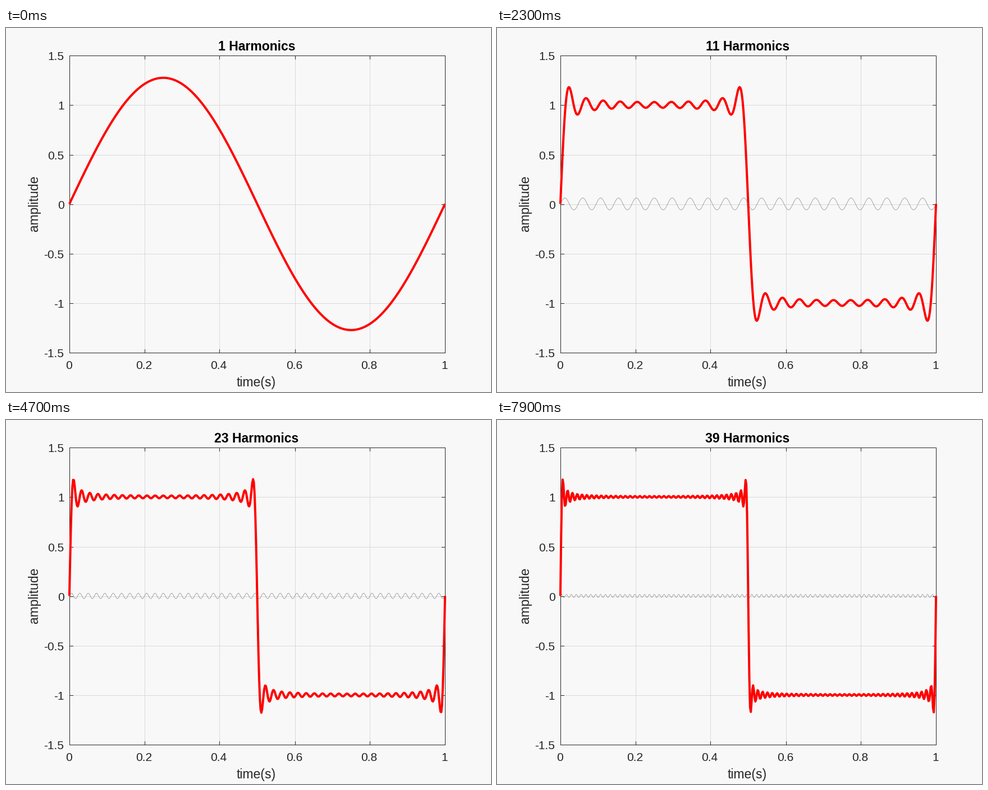
Write a matplotlib script that moves like this. It is 864 px wide and 648 px high and loops after 8 s.

```python
import numpy as np
import matplotlib.pyplot as plt
from matplotlib.animation import FuncAnimation

W, H = 864, 648
BG, INK, GRID = "#f8f8f8", "#262626", "#d9d9d9"
COLS = [113, 247, 380, 515, 648, 782]
ROWS = [49, 137, 226, 314, 402, 490, 578]
LEFT, RIGHT, TOP, BOTTOM = COLS[0], COLS[-1], ROWS[0], ROWS[-1]
TICK = 7

plt.rcParams["font.family"] = "Liberation Sans"
plt.rcParams["path.simplify"] = False

fig = plt.figure(figsize=(W / 72, H / 72), dpi=72, facecolor=BG)
ax = fig.add_axes([0, 0, 1, 1])
ax.set_xlim(0, W)
ax.set_ylim(H, 0)
ax.axis("off")


def rule(x0, y0, x1, y1, color, z):
    """One-pixel straight line between pixel indices, both included."""
    ax.plot([x0 + 0.5, x1 + 0.5], [y0 + 0.5, y1 + 0.5], color=color, lw=1,
            solid_capstyle="projecting", snap=False, zorder=z)


def label(x, y, s, size=23, color=INK, ha="center", **kw):
    return ax.text(x, y, s, size=size, color=color, ha=ha, va="baseline", **kw)


for x in COLS[1:-1]:
    rule(x, TOP, x, BOTTOM, GRID, 1)
for y in ROWS[1:-1]:
    rule(LEFT, y, RIGHT, y, GRID, 1)

for i, x in enumerate(COLS):
    rule(x, TOP, x, TOP + TICK - 1, INK, 2)
    rule(x, BOTTOM - TICK + 1, x, BOTTOM, INK, 2)
    label(x - 1, 607, f"{i * 0.2:.1g}", 21)
for i, y in enumerate(ROWS):
    rule(LEFT, y, LEFT + TICK - 1, y, INK, 2)
    rule(RIGHT - TICK + 1, y, RIGHT, y, INK, 2)
    label(103.5, y + 8, f"{1.5 - i * 0.5:g}", 21, ha="right")

for x in (LEFT, RIGHT):
    rule(x, TOP, x, BOTTOM, INK, 2)
for y in (TOP, BOTTOM):
    rule(LEFT, y, RIGHT, y, INK, 2)

label(446, 638, "time(s)")
label(57, 312, "amplitude", rotation=90, rotation_mode="anchor")
title = label(446.5, 40, "", color="black", weight="bold")

t = np.linspace(0, 1, 500)
px = 112.9 + 669.2 * t
term_line, = ax.plot(px, px, color="#808080", lw=0.67, zorder=3)
sum_line, = ax.plot(px, px, color="red", lw=4, zorder=4,
                    solid_capstyle="butt", solid_joinstyle="round")


def term(k):
    """k-th odd harmonic of a unit square wave."""
    n = 2 * k - 1
    return 4 / (np.pi * n) * np.sin(2 * np.pi * n * t)


def to_px(v):
    return 313.2 - 176.33 * v


def draw(frame):
    count = 1 if frame < 5 else 2 + (frame - 5) // 2
    term_line.set_ydata(to_px(term(count)))
    sum_line.set_ydata(to_px(sum(term(k) for k in range(1, count + 1))))
    title.set_text(f"{count} Harmonics")
    return term_line, sum_line, title


anim = FuncAnimation(fig, draw, frames=80, interval=100, repeat=True,
                     repeat_delay=0, init_func=lambda: draw(0))
plt.show()
```
